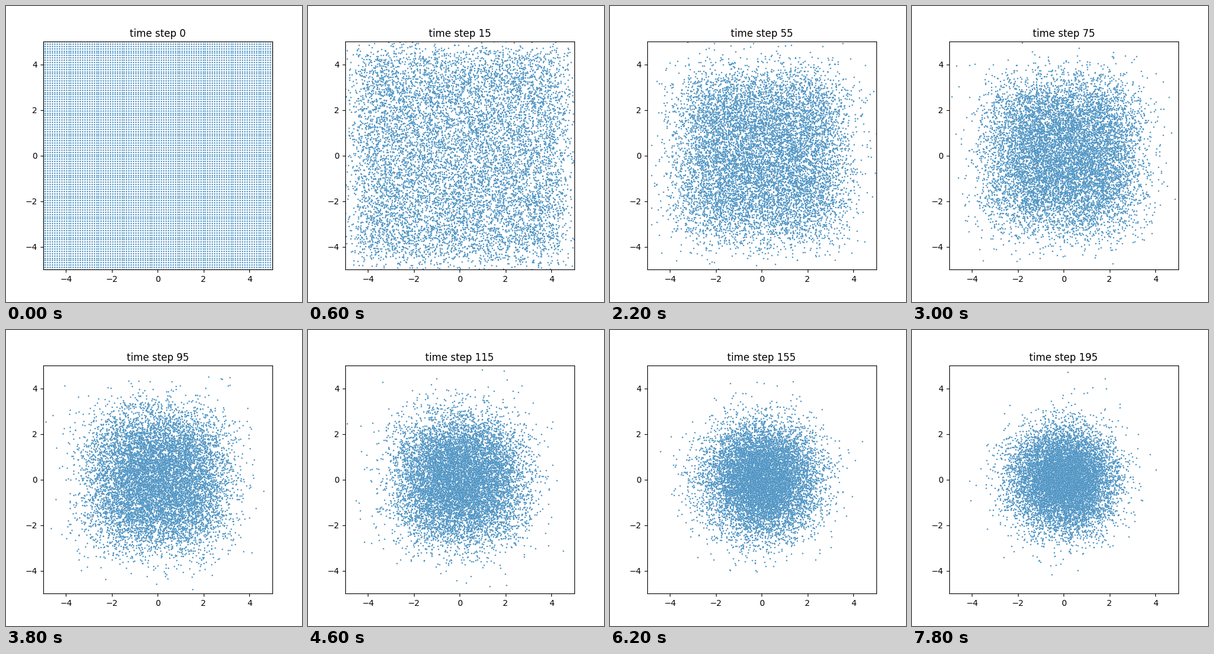
Write a matplotlib script that moves like this. It is 500 by 500 pixels and loops after 8 s.

```python
import numpy as np
import matplotlib.pyplot as plt
from matplotlib.animation import FuncAnimation

GRID = 100
LIMIT = 5
STEP = 0.009
STRIDE = 5
FRAMES = 40
INTERVAL = 200
SIZE = 3


def langevin_path():
    """Points on a grid drift towards a standard normal distribution."""
    rng = np.random.RandomState(0)
    axis = np.linspace(-LIMIT, LIMIT, GRID)
    pos = np.stack(np.meshgrid(axis, axis), axis=-1).reshape(-1, 2)
    path = [pos]
    for step in range(1, STRIDE * (FRAMES - 1) + 1):
        noise = rng.standard_normal(pos.shape)
        pos = pos - STEP * pos + np.sqrt(2 * STEP) * noise
        if step % STRIDE == 0:
            path.append(pos)
    return path


path = langevin_path()
fig, ax = plt.subplots(figsize=(5, 5), dpi=100)
dots = ax.scatter(path[0][:, 0], path[0][:, 1], s=SIZE, color="#1f77b4",
                  edgecolors="white", linewidths=0.08 * np.sqrt(SIZE))
ax.set_xlim(-LIMIT, LIMIT)
ax.set_ylim(-LIMIT, LIMIT)
title = ax.set_title("time step 0")


def update(i):
    dots.set_offsets(path[i])
    title.set_text(f"time step {i * STRIDE}")
    return dots, title


anim = FuncAnimation(fig, update, frames=FRAMES, interval=INTERVAL,
                     repeat=True, repeat_delay=0)
plt.show()
```
